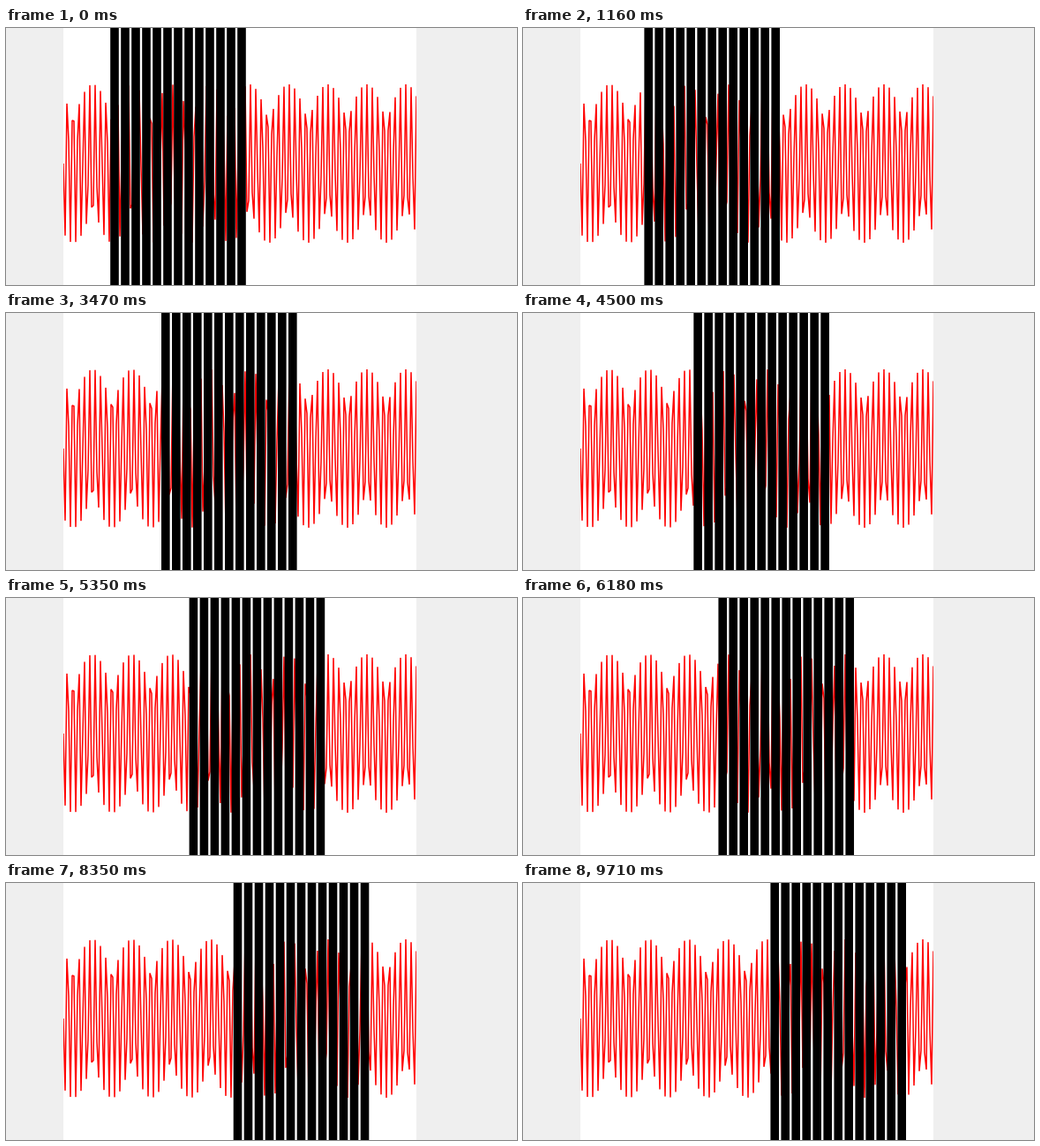
Recreate the animation shown at these times as a matplotlib script. Size 579x292 px, loop 9.73 s.

```python
import numpy as np
import matplotlib.pyplot as plt
from matplotlib.animation import FuncAnimation
from matplotlib.patches import Rectangle

W, H, DPI = 579, 292, 100
LOOP, STEP = 9730, 14
LEFT, WIDTH = 65, 400
MID, AMP = 154, 90
BARS, PITCH, BAR = 13, 12, 9.6
START, SPEED = 118.2, 0.01672  # px, px per ms

fig = plt.figure(figsize=(W / DPI, H / DPI), dpi=DPI, facecolor="#efefef")
ax = fig.add_axes([0, 0, 1, 1])
ax.set_xlim(0, W)
ax.set_ylim(H, 0)
ax.axis("off")

panel = Rectangle((LEFT, 0), WIDTH, H, fc="white", lw=0)
ax.add_patch(panel)

# sine sampled every 2 px, which gives the beating look
x = np.arange(0, WIDTH + 1, 2)
wave, = ax.plot(LEFT + x, MID + AMP * np.sin(x), color="red",
                lw=1.5 * 72 / DPI, solid_joinstyle="bevel",
                solid_capstyle="butt")
wave.set_clip_path(panel)

grating = [Rectangle((0, 0), BAR, H, fc="black", lw=0, snap=False, zorder=3)
           for _ in range(BARS)]
for bar in grating:
    ax.add_patch(bar)


def draw(i):
    left = START + SPEED * STEP * i
    for k, bar in enumerate(grating):
        bar.set_x(left + PITCH * k)
    return grating


anim = FuncAnimation(fig, draw, frames=LOOP // STEP, interval=STEP,
                     init_func=lambda: draw(0), repeat=True, repeat_delay=0)
plt.show()
```
